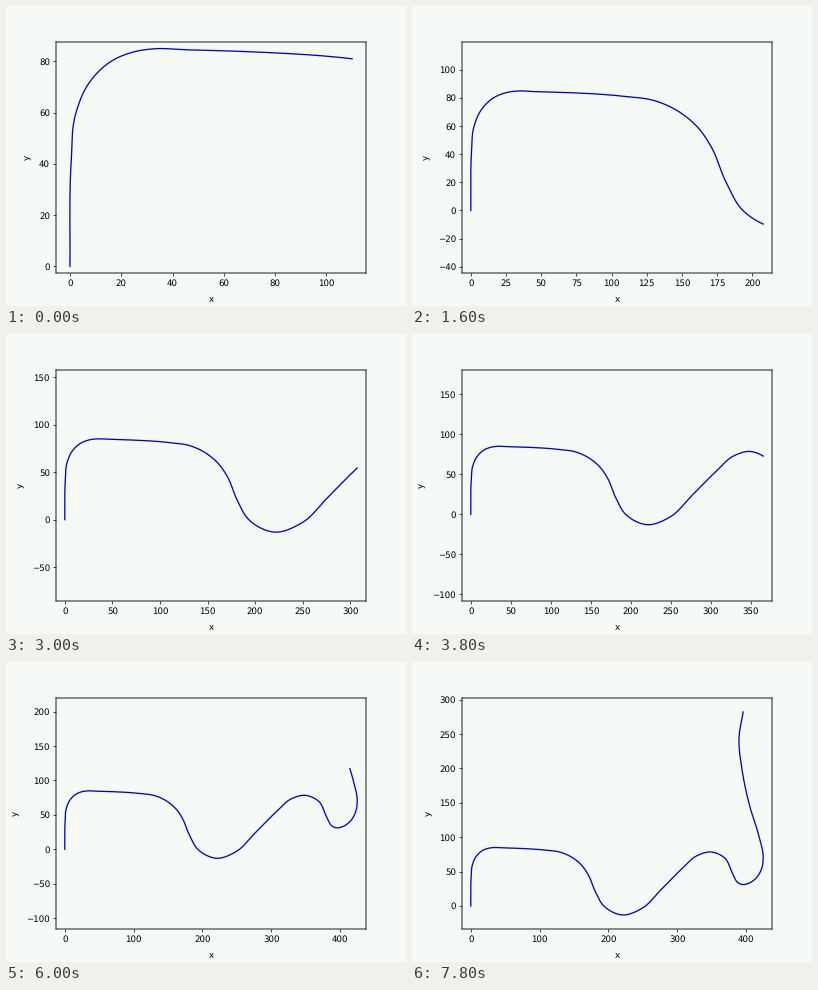
Recreate the animation shown at these times as a matplotlib script. Size 400 by 300 pixels, loop 8000 ms.

```python
import numpy as np
import matplotlib.pyplot as plt
from matplotlib.animation import FuncAnimation

FRAMES, STEP_MS = 40, 200
MARGIN = 1.06
START_X = 110
PAPER = "#f6faf6"

plt.rcParams.update({"text.hinting": "none", "path.snap": False,
                     "axes.linewidth": 1.0, "axes.labelpad": 8})

# Key points of the drive, in data units.
KEYS = np.array([
    (0, 0), (0.5, 41), (2.1, 59), (7.4, 71.5), (16.7, 80.4), (25, 83.7),
    (33, 84.9), (45, 84.5), (66, 83.9), (110, 81), (130, 78.2),
    (148.4, 69.9), (162, 58.3), (171, 45), (181, 21), (193.4, 0),
    (220.5, -13.1), (250, -2.8), (276, 23), (307.3, 54.3), (328, 72.6),
    (349, 78.5), (369, 70), (381, 46.5), (388.5, 33.8), (394.5, 31.2),
    (403, 32.5), (413.4, 39), (424, 58), (425.2, 69), (419.2, 101),
    (406, 143.6), (394.5, 197.5), (390, 244), (396, 282),
])


def lengths(points):
    """Distance covered up to each point."""
    steps = np.hypot(*np.diff(points, axis=0).T)
    return np.concatenate([[0], np.cumsum(steps)])


def hermite(u, us, vs):
    """Smooth curve through the knots (us, vs)."""
    slope = np.gradient(vs, us)
    i = np.clip(np.searchsorted(us, u, side="right") - 1, 0, len(us) - 2)
    h = us[i + 1] - us[i]
    t = (u - us[i]) / h
    return ((1 + 2 * t) * (1 - t) ** 2 * vs[i] + t * (1 - t) ** 2 * h * slope[i]
            + t * t * (3 - 2 * t) * vs[i + 1] + t * t * (t - 1) * h * slope[i + 1])


knots = lengths(KEYS)
u = np.linspace(0, knots[-1], 4000)
track = np.column_stack([hermite(u, knots, v) for v in KEYS.T])
arc = lengths(track)

# Speed rises slowly and dips while taking the tight bend.
mid = np.arange(FRAMES - 1) + 0.5
speed = 17.7 + 0.03 * mid - 7.2 * np.exp(-((mid - 22.6) / 2.9) ** 2 / 2)
start = arc[np.argmax(track[:, 0] >= START_X)]
travel = np.concatenate([[0], np.cumsum(speed)])
travel = start + travel * (arc[-1] - start) / travel[-1]

fig, ax = plt.subplots(figsize=(6.4, 4.8), dpi=62.5, facecolor=PAPER)
ax.set_facecolor(PAPER)
ax.set_xlabel("x")
ax.set_ylabel("y")
line, = ax.plot([], [], color="#0000dc", lw=1.5)
size = np.array(ax.get_window_extent().size)


def draw(frame):
    s = np.linspace(0, travel[frame], 700)
    x, y = (np.interp(s, arc, v) for v in track.T)
    line.set_data(x, y)

    # Equal scale on both axes, centred on the data.
    unit = MARGIN * max(np.ptp(x) / size[0], np.ptp(y) / size[1])
    half_w, half_h = unit * size / 2
    cx, cy = (x.min() + x.max()) / 2, (y.min() + y.max()) / 2
    ax.set_xlim(cx - half_w, cx + half_w)
    ax.set_ylim(cy - half_h, cy + half_h)
    return line,


anim = FuncAnimation(fig, draw, frames=FRAMES, interval=STEP_MS,
                     repeat=True, repeat_delay=0, blit=False)
plt.show()
```
